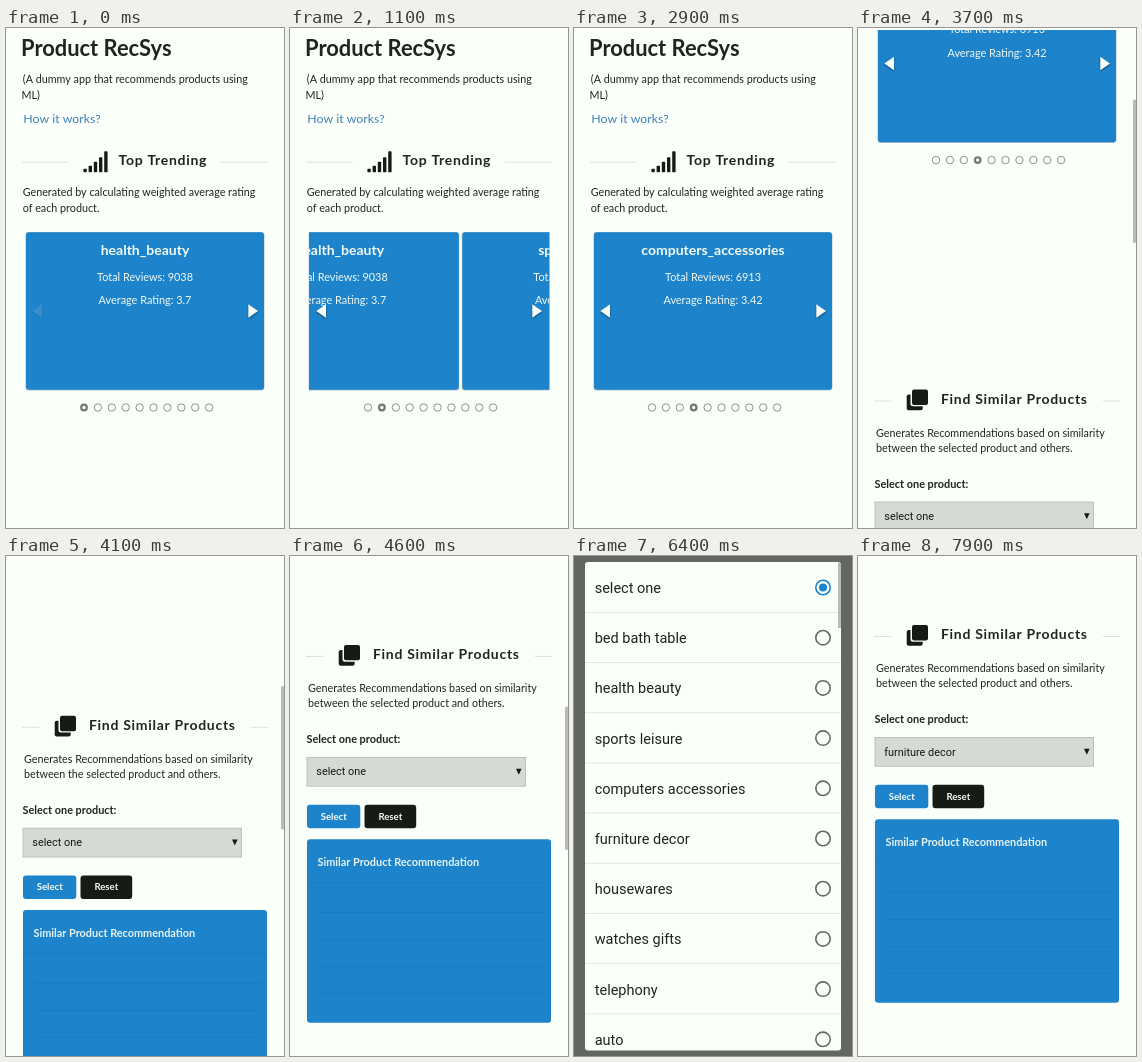
These frames come from a looping animation (278 px wide and 500 px high, 8 s). An HTML page with a canvas:

```html
<!DOCTYPE html>
<html lang="en">
<head>
<meta charset="utf-8">
<title>Product RecSys</title>
<style>
html, body { margin: 0; width: 100%; height: 100%; overflow: hidden; background: #fbfffa; }
canvas { display: block; width: 278px; height: 500px; }
</style>
</head>
<body>
<canvas id="stage"></canvas>
<script>
const W = 278, H = 500, LOOP = 8000;
const PAPER = '#fbfffa', INK = '#20241f', BLACK = '#161b15', BLUE = '#1d83cb', LINE = '#dde0dc';
const LATO = 'Lato, sans-serif', ROBOTO = 'Roboto, sans-serif';

const canvas = document.getElementById('stage');
const ctx = canvas.getContext('2d');
const dpr = window.devicePixelRatio || 1;
canvas.width = W * dpr;
canvas.height = H * dpr;

const slides = [
  ['health_beauty', 9038, '3.7'],
  ['sports_leisure', 7827, '3.6'],
  ['bed_bath_table', 10223, '3.58'],
  ['computers_accessories', 6913, '3.42'],
];
const options = ['select one', 'bed bath table', 'health beauty', 'sports leisure',
  'computers accessories', 'furniture decor', 'housewares', 'watches gifts', 'telephony', 'auto'];
const slideStarts = [875, 1380, 2190];
const SLIDE_TIME = 500, PITCH = 241.5;
const PICK = 7480, PICKED = 5;
const scrollKeys = [[2950, 0], [3000, 7], [3200, 70], [3700, 247], [3900, 365],
  [4200, 475], [4600, 520], [4800, 524], [5200, 537], [5500, 540]];

const clamp = v => Math.min(1, Math.max(0, v));
const progress = (t, start, length) => clamp((t - start) / length);
const easeInOut = p => p < .5 ? 4 * p ** 3 : 1 - 4 * (1 - p) ** 3;

// Monotone cubic interpolation through time/value pairs.
function follow(keys, t) {
  const last = keys.length - 1;
  if (t <= keys[0][0]) return keys[0][1];
  if (t >= keys[last][0]) return keys[last][1];
  const i = keys.findIndex(k => k[0] > t) - 1;
  const slope = n => (keys[n + 1][1] - keys[n][1]) / (keys[n + 1][0] - keys[n][0]);
  const tangent = n => {
    if (n === 0 || n === last) return 0;
    const a = slope(n - 1), b = slope(n);
    return 2 * a * b / (a + b || 1);
  };
  const span = keys[i + 1][0] - keys[i][0], u = (t - keys[i][0]) / span;
  const rise = keys[i + 1][1] - keys[i][1];
  return keys[i][1] + rise * u * u * (3 - 2 * u)
    + span * (tangent(i) * u * (1 - u) ** 2 - tangent(i + 1) * u * u * (1 - u));
}

function text(str, x, y, font, color = INK, align = 'left', spacing = 0) {
  ctx.font = font;
  ctx.fillStyle = color;
  ctx.textAlign = align;
  ctx.letterSpacing = spacing + 'px';
  ctx.fillText(str, x, y);
}

function rect(x, y, w, h, color) {
  ctx.fillStyle = color;
  ctx.fillRect(x, y, w, h);
}

function box(x, y, w, h, r, color) {
  ctx.fillStyle = color;
  ctx.beginPath();
  ctx.roundRect(x, y, w, h, r);
  ctx.fill();
}

function disc(x, y, r, color) {
  ctx.fillStyle = color;
  ctx.beginPath();
  ctx.arc(x, y, r, 0, Math.PI * 2);
  ctx.fill();
}

function ring(x, y, r, width, color) {
  ctx.strokeStyle = color;
  ctx.lineWidth = width;
  ctx.beginPath();
  ctx.arc(x, y, r, 0, Math.PI * 2);
  ctx.stroke();
}

function triangle(color, ...points) {
  ctx.fillStyle = color;
  ctx.beginPath();
  points.forEach(([x, y]) => ctx.lineTo(x, y));
  ctx.fill();
}

const body = `10.75px ${LATO}`, cardBody = `10.9px ${LATO}`;
const bodyBold = `bold 10.9px ${LATO}`, heading = `bold 14px ${LATO}`;

function drawIntro() {
  text('Product RecSys', 15, 27.9, `bold 21.9px ${LATO}`);
  text('(A dummy app that recommends products using', 16.8, 55.2, body);
  text('ML)', 15.5, 70.8, body);
  text('How it works?', 17.3, 95.3, `12.3px ${LATO}`, '#3f81b8');
  rect(16, 133.7, 47, 1, LINE);
  rect(215, 133.7, 47, 1, LINE);
  [3.5, 6.5, 10.5, 15, 21].forEach((h, i) => box(77.4 + i * 5.2, 144.3 - h, 3.4, h, .8, BLACK));
  text('Top Trending', 112.5, 137.1, heading, INK, 'left', .7);
  text('Generated by calculating weighted average rating', 16.7, 168.3, body);
  text('of each product.', 16.7, 183.5, body);
}

function drawSlide([name, reviews, rating], dx) {
  box(19.5 + dx, 204, 239, 158.4, 3, '#b4c4cd');
  box(20 + dx, 204.3, 238, 157.4, 3, BLUE);
  const mid = 139 + dx;
  text(name, mid, 227, heading, '#f4fbf6', 'center');
  text('Total Reviews: ' + reviews, mid, 252.5, cardBody, '#f0f8f4', 'center');
  text('Average Rating: ' + rating, mid, 276, cardBody, '#f0f8f4', 'center');
}

function drawCarousel(t) {
  const position = slideStarts.reduce((sum, s) => sum + easeInOut(progress(t, s, SLIDE_TIME)), 0);
  const active = slideStarts.filter(s => t >= s).length;
  ctx.save();
  ctx.beginPath();
  ctx.rect(18.9, 200, 240.5, 168);
  ctx.clip();
  slides.forEach((slide, i) => {
    const dx = (i - position) * PITCH;
    if (Math.abs(dx) < 250) drawSlide(slide, dx);
  });
  ctx.restore();

  ctx.save();
  ctx.shadowColor = 'rgba(0,0,0,.45)';
  ctx.shadowBlur = 2 * dpr;
  ctx.shadowOffsetY = dpr;
  triangle('#fbfffa', [242.3, 276.3], [252, 283], [242.3, 289.7]);
  ctx.globalAlpha = active ? 1 : .14;
  triangle('#fbfffa', [36, 276.3], [26.3, 283], [36, 289.7]);
  ctx.restore();

  for (let i = 0; i < 10; i++) {
    const x = 78 + i * 13.9;
    if (i === active) ring(x, 379.5, 2.8, 2.2, '#737672');
    else ring(x, 379.5, 3.7, .9, '#81847f');
  }
}

function drawFinder(choice) {
  ctx.save();
  ctx.translate(0, 520);
  rect(16, 100, 17, 1, LINE);
  rect(245, 100, 17, 1, LINE);
  box(48.7, 94, 16, 15.7, 2, BLACK);
  box(52.5, 87.5, 19, 18.3, 2.5, PAPER);
  box(54, 89, 16, 15.4, 2, BLACK);
  text('Find Similar Products', 83, 103.3, heading, INK, 'left', .7);
  text('Generates Recommendations based on similarity', 18, 136, body);
  text('between the selected product and others.', 18, 151.3, body);
  text('Select one product:', 16.5, 187.3, bodyBold);

  rect(16.5, 201, 219.5, 29.7, '#b7bab5');
  rect(17.3, 201.8, 217.9, 28.1, '#d6dad4');
  text(choice, 26.3, 219.5, `10.9px ${ROBOTO}`, '#151914');
  triangle('#151914', [226, 212.8], [231.6, 212.8], [228.8, 218.8]);

  const button = `bold 9.6px ${LATO}`;
  box(17, 248.7, 53.3, 23.5, 3, BLUE);
  text('Select', 43.7, 263.6, button, '#f4fbf6', 'center');
  box(74.5, 248.7, 51.7, 23.5, 3, BLACK);
  text('Reset', 100.3, 263.6, button, '#f4fbf6', 'center');

  box(17, 283.3, 244, 183.4, 3, BLUE);
  text('Similar Product Recommendation', 27.5, 310, bodyBold, '#e6f3f3');
  rect(17, 326, 244, .8, '#1b7cc1');
  for (let i = 0; i < 4; i++) rect(28, 356 + i * 27, 228, .8, '#1b7bbe');
  ctx.restore();
}

function drawScrollbar(t, scroll) {
  ctx.globalAlpha = progress(t, 2950, 50) * (1 - progress(t, 5400, 300));
  rect(275, scroll * .29, 3, 143, '#b9bcb7');
  ctx.globalAlpha = 1;
}

function drawDialog(t, alpha) {
  ctx.globalAlpha = alpha;
  rect(0, 0, W, H, 'rgba(0,0,0,.6)');
  ctx.save();
  ctx.beginPath();
  ctx.roundRect(11, 6, 256, 488.5, 3);
  ctx.clip();
  rect(11, 6, 256, 489, PAPER);
  const chosen = t >= PICK ? PICKED : 0;
  options.forEach((option, i) => {
    const y = 31.5 + i * 50.2;
    text(option, 20.7, y + 5.4, `14.5px ${ROBOTO}`, '#20241f');
    rect(11, y + 24.3, 256, 1, '#e2e6e1');
    const on = i === chosen;
    ring(249, y, 7.2, 1.6, on ? BLUE : '#656964');
    if (on) disc(249, y, 4, BLUE);
  });
  rect(264, 7, 3, 65, '#b9bcb7');
  ctx.restore();
  ctx.globalAlpha = 1;
}

function draw(t) {
  ctx.setTransform(dpr, 0, 0, dpr, 0, 0);
  rect(0, 0, W, H, PAPER);
  const scroll = follow(scrollKeys, t);
  ctx.save();
  ctx.translate(0, -scroll);
  drawIntro();
  drawCarousel(t);
  drawFinder(options[t >= 7600 ? PICKED : 0]);
  ctx.restore();
  if (scroll > 0) rect(0, 0, W, 2, PAPER);
  drawScrollbar(t, scroll);
  const dialog = progress(t, 6050, 330) * (1 - progress(t, 7560, 320));
  if (dialog > 0) drawDialog(t, dialog);
}

function tick() {
  draw(performance.now() % LOOP);
  requestAnimationFrame(tick);
}
tick();
</script>
</body>
</html>
```
